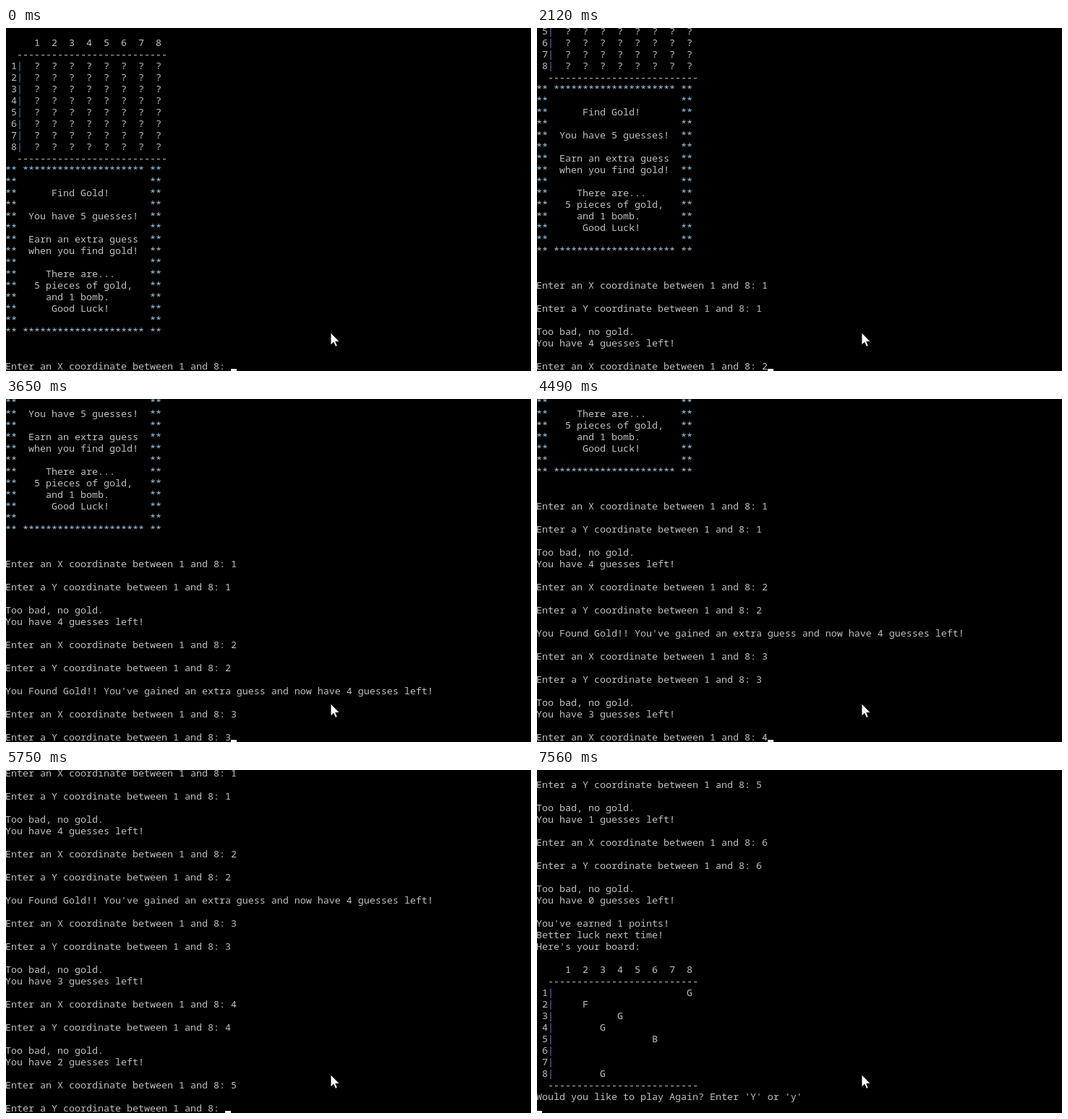
Recreate the animation shown at these times as an HTML page. Size 726 px wide and 475 px high, loop 8000 ms.

```html
<!DOCTYPE html>
<html lang="en">
<head>
<meta charset="utf-8">
<title>Find Gold</title>
<style>
  html, body { margin: 0; width: 100%; height: 100%; overflow: hidden; background: #000; }
  #stage { position: relative; width: 726px; height: 475px; overflow: hidden; background: #000; }
  #screen {
    position: absolute; left: -1px; bottom: -1px; margin: 0;
    font: 13.3333px/16px "Noto Sans Mono", "DejaVu Sans Mono", monospace;
    color: #c0c0c0; white-space: pre;
  }
  #screen .bar { color: #4690c8; }
  #screen .star { color: #a9cbe2; }
  #caret { position: absolute; top: 472px; width: 8px; height: 4px; background: #f4f4f4; }
  #mouse { position: absolute; left: 448px; top: 421px; }
</style>
</head>
<body>
<div id="stage">
  <pre id="screen"></pre>
  <div id="caret"></div>
  <svg id="mouse" width="15" height="22">
    <path d="M1 1V18L5 14.3L7.6 20.3L10.2 19.2L7.6 13.3H13Z" fill="#fff" stroke="#000" stroke-width=".8"/>
  </svg>
</div>
<script>
const LOOP = 8000, CELL = 8;
const askX = "Enter an X coordinate between 1 and 8: ";
const askY = "\n\nEnter a Y coordinate between 1 and 8: ";

function board(cell) {
  const nums = [1, 2, 3, 4, 5, 6, 7, 8];
  const rule = "  " + "-".repeat(26);
  const rows = nums.map(y => ` ${y}|` + nums.map(x => "  " + cell(x, y)).join(""));
  return ["     " + nums.join("  "), rule, ...rows, rule].join("\n") + "\n";
}

function banner() {
  const edge = `** ${"*".repeat(21)} **`;
  const lines = [
    "", "      Find Gold!", "", "  You have 5 guesses!", "",
    "  Earn an extra guess", "  when you find gold!", "",
    "     There are...", "   5 pieces of gold,", "     and 1 bomb.", "      Good Luck!", ""
  ];
  return [edge, ...lines.map(s => "**" + s.padEnd(23) + "**"), edge].join("\n") + "\n\n\n";
}

const miss = left => `\n\nToo bad, no gold.\nYou have ${left} guesses left!\n\n`;
const gold = "\n\nYou Found Gold!! You've gained an extra guess and now have 4 guesses left!\n\n";
const found = { "8,1": "G", "2,2": "F", "4,3": "G", "3,4": "G", "6,5": "B", "3,8": "G" };
const ending = miss(0) + "You've earned 1 points!\nBetter luck next time!\nHere's your board:\n\n" +
  board((x, y) => found[[x, y]] || " ") +
  "Would you like to play Again? Enter 'Y' or 'y'\n";

// time, text added, caret shown
const steps = [
  [0, board(() => "?") + banner() + askX, 1],
  [370, "", 0],
  [930, "", 1],
  [1180, "1", 1],
  [1300, askY, 1],
  [1450, "1", 1],
  [1570, miss(4) + askX, 1],
  [2120, "2", 1],
  [2270, askY, 1],
  [2390, "2", 0],
  [2510, "", 1],
  [2630, gold + askX, 1],
  [3410, "3", 1],
  [3530, askY, 1],
  [3650, "3", 1],
  [3800, miss(3) + askX, 1],
  [4490, "4", 1],
  [4640, askY, 1],
  [4760, "4", 1],
  [5010, miss(2) + askX, 1],
  [5600, "5", 0],
  [5750, askY, 1],
  [5870, "5", 1],
  [5990, miss(1) + askX, 1],
  [6580, "", 0],
  [7100, "6", 0],
  [7260, askY, 1],
  [7410, "6", 1],
  [7560, ending, 1]
];

const screenEl = document.getElementById("screen");
const caret = document.getElementById("caret");
const tint = s => s
  .replace(/\|/g, '<span class="bar">|</span>')
  .replace(/\*+/g, '<span class="star">$&</span>');

let shown = -1;
function show(i) {
  if (i === shown) return;
  shown = i;
  const text = steps.slice(0, i + 1).map(s => s[1]).join("");
  const column = text.length - text.lastIndexOf("\n") - 1;
  // the trailing space keeps an empty last line open
  screenEl.innerHTML = tint(text) + " ";
  caret.style.left = column * CELL - 1 + "px";
  caret.style.visibility = steps[i][2] ? "visible" : "hidden";
}

const start = performance.now();
function tick() {
  const t = (performance.now() - start) % LOOP;
  show(steps.filter(s => s[0] <= t).length - 1);
  requestAnimationFrame(tick);
}
tick();
</script>
</body>
</html>
```
